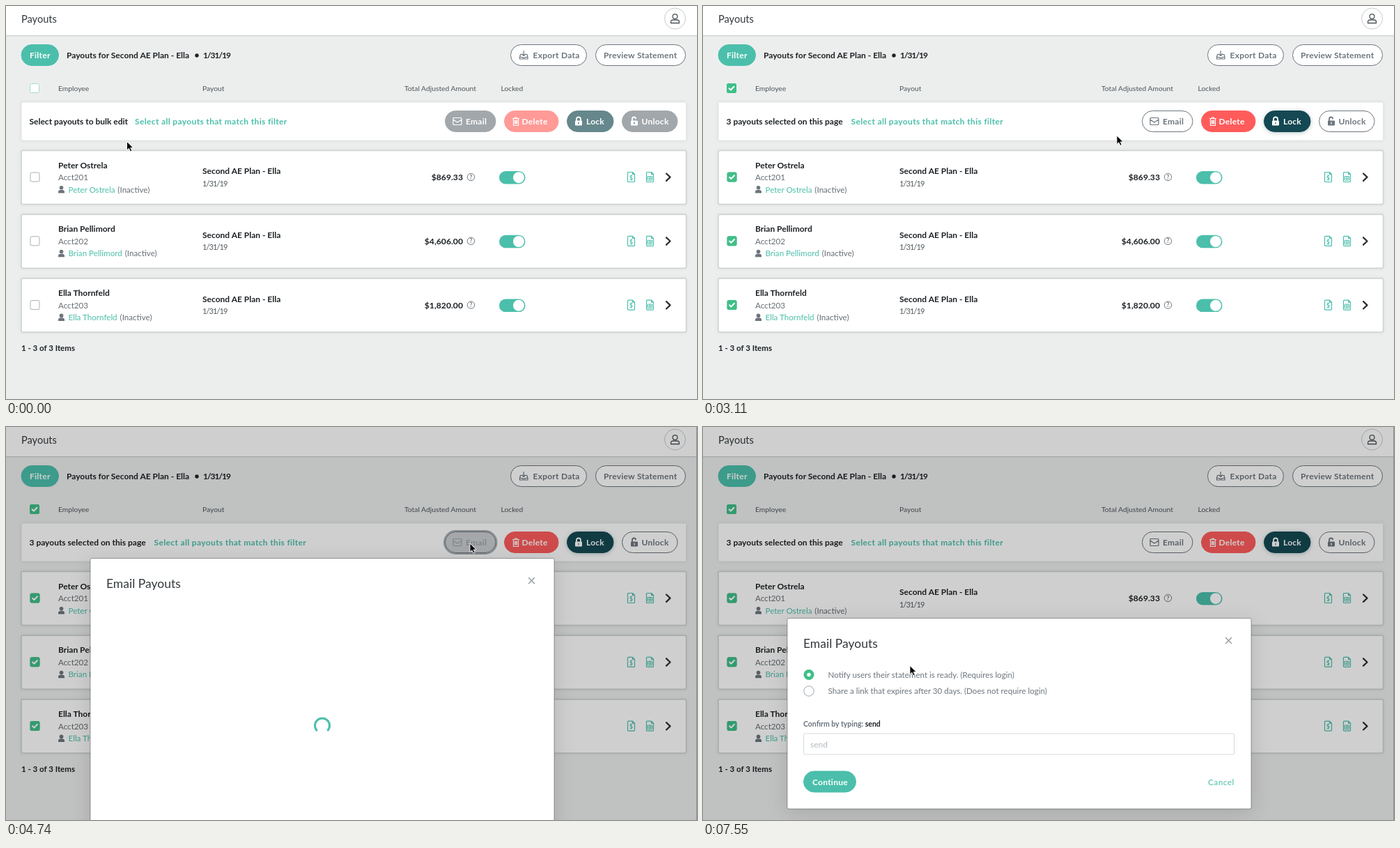
Animation of 992x564 px, one loop 8 s. Source, as an HTML page:

```html
<!DOCTYPE html>
<html lang="en">
<head>
<meta charset="utf-8">
<title>Email payouts</title>
<style>
  html, body { margin: 0; width: 100%; height: 100%; overflow: hidden; background: #eceeee; }
  svg { display: block; font: 12px Lato, "Open Sans", sans-serif; }
  text { white-space: pre; }
  .b { font-weight: 700; }
  .date { letter-spacing: -1px; }
  .wide { letter-spacing: .35px; }
  .btn { font-weight: 700; letter-spacing: .25px; }
  .card { filter: drop-shadow(0 0 2px rgba(0,0,0,.08)); }
  .glow { filter: drop-shadow(0 1px 3px rgba(20,72,82,.3)); }
  #modal { filter: drop-shadow(0 6px 14px rgba(0,0,0,.13)); }
</style>
</head>
<body>
<svg id="stage" width="992" height="564" viewBox="0 0 992 564"></svg>
<script>
const TEAL = '#4bbfab', GREEN = '#3fbf88', GRAY = '#6c757d', INK = '#1d2124', RED = '#ff5b5b', NAVY = '#144852';
const stage = document.getElementById('stage');

const text = (x, y, str, { size = 12, fill = INK, cls = '', anchor = 'start' } = {}) =>
  `<text x="${x}" y="${y}" font-size="${size}" fill="${fill}" class="${cls}" text-anchor="${anchor}">${str}</text>`;
const rect = (x, y, w, h, r, fill, stroke = 'none', more = '') =>
  `<rect x="${x}" y="${y}" width="${w}" height="${h}" rx="${r}" fill="${fill}" stroke="${stroke}" ${more}/>`;
const line = (x, y, d, color, width = 1.2, fill = 'none') =>
  `<path transform="translate(${x} ${y})" d="${d}" fill="${fill}" stroke="${color}" stroke-width="${width}" stroke-linejoin="round" stroke-linecap="round"/>`;

const ICON = {
  mail: 'M1 0H11Q12 0 12 1V9Q12 10 11 10H1Q0 10 0 9V1Q0 0 1 0M0 2.5L6 6.5 12 2.5',
  trash: 'M0 2H9M3 2V.5H6V2M1 2V12H8V2M3 4.5V9.5M4.5 4.5V9.5M6 4.5V9.5',
  tray: 'M3 5H1.5L.5 9V11.5H12V9L11 5H9.5M.5 9H4L5 10H7.5L8.5 9H12M6.2 0V6.5M3.8 4.5L6.2 7 8.6 4.5',
  doc: 'M1 0H7L10 3V13Q10 14 9 14H1Q0 14 0 13V1Q0 0 1 0M7 0V3H10',
  grid: 'M2 6H8V11.5H2ZM2 8.7H8M5 6V11.5',
  close: 'M0 0L8 8M8 0L0 8',
  check: 'M0 2.5L2.3 4.8 6.8 0'
};

// A pill button with an optional icon
function pill(x, y, w, label, tx, fill, color, { stroke = fill, icon = '', cls = '' } = {}) {
  return rect(x + .5, y + .5, w - 1, 30, 15, fill, stroke, `class="${cls}"`) + icon +
    text(tx, y + 20, label, { fill: color, cls: 'btn' });
}
const padlock = (x, y, color, open) =>
  rect(x, y + 5.5, 10, 7, 1, color) +
  line(x, y, open ? 'M2 5.5V3Q2 .5 4.5 .5T7 2.5' : 'M2 5.5V3.5Q2 .5 5 .5T8 3.5V5.5', color, 1.8) +
  rect(x + 4.3, y + 7.5, 1.4, 3, .5, color === 'white' ? '#5b7c82' : 'white');

const email = (fill, color, stroke) =>
  pill(630, 150, 73.5, 'Email', 660, fill, color, { stroke, icon: line(642, 160.5, ICON.mail, color) });
const remove = (fill) => pill(715, 150, 78.5, 'Delete', 740.5, fill, 'white', { icon: line(727.5, 159.5, ICON.trash, 'white') });
const lock = (fill, cls) => pill(805, 150, 67.5, 'Lock', 833, fill, 'white', { cls, icon: padlock(817, 159, 'white') });
const unlock = (fill, color, stroke) =>
  pill(884, 150, 80.5, 'Unlock', 912.5, fill, color, { stroke, icon: padlock(897, 159, color, true) });

const checkbox = (x, y, stroke) => rect(x + .5, y + .5, 13, 13, 2, 'white', stroke);
const checked = (x, y) => rect(x, y, 14, 14, 2.5, GREEN) + line(x + 3.6, y + 4.7, ICON.check, 'white', 2);
const person = (x, y, color) =>
  `<g transform="translate(${x} ${y})" fill="${color}"><circle cx="4.5" cy="2.8" r="2.8"/><path d="M0 10.5V9Q0 6 3 6H6Q9 6 9 9V10.5Z"/></g>`;

const rows = [
  ['Peter Ostrela', 'Acct201', '$869.33'],
  ['Brian Pellimord', 'Acct202', '$4,606.00'],
  ['Ella Thornfeld', 'Acct203', '$1,820.00']
];
const rowY = (i) => 207 + 91.8 * i;

function row([name, id, amount], i) {
  const small = { size: 11.6, fill: '#666d73' };
  return `<g transform="translate(0 ${rowY(i)})">` +
    rect(22, .5, 954.5, 77, 2, 'white', '#cdd1d3', 'stroke-width="1.5" class="card"') +
    checkbox(34.5, 31.5, '#a9afb4') +
    text(75, 25.5, name, { cls: 'b' }) + text(75, 43, id, small) + person(75, 51, GRAY) +
    text(89.5, 60.5, `<tspan fill="${TEAL}">${name}</tspan><tspan dx="1"> (Inactive)</tspan>`, small) +
    text(282, 34, 'Second AE Plan - Ella', { cls: 'b' }) +
    text(282, 51.5, '1/31/19', { size: 11.2, fill: '#555c61', cls: 'date' }) +
    text(656, 43, amount, { size: 12.2, cls: 'b', anchor: 'end' }) +
    `<circle cx="667.5" cy="38.5" r="5.2" fill="none" stroke="${GRAY}"/>` +
    text(667.5, 41.7, '?', { size: 8.5, fill: GRAY, cls: 'b', anchor: 'middle' }) +
    rect(708, 30, 37.5, 18.5, 9.2, TEAL) + '<circle cx="736" cy="39.2" r="8" fill="white"/>' +
    line(892.5, 31.5, ICON.doc, TEAL) + text(897.5, 42.8, '$', { size: 8.5, fill: TEAL, cls: 'b', anchor: 'middle' }) +
    line(919.5, 31.5, ICON.doc, TEAL) + line(919.5, 31.5, ICON.grid, TEAL, 1) +
    line(948, 33.5, 'M0 0L5.5 5.2 0 10.4', '#2b3236', 2.3) + '</g>';
}

const matchLink = (x) => text(x, 170, 'Select all payouts that match this filter', { fill: TEAL, cls: 'b wide' });
const heading = (x, str) => text(x, 121.5, str, { size: 10.3, fill: '#4d5458' });

const page =
  rect(0, 0, 992, 564, 0, '#eceeee') + rect(0, 0, 992, 42, 0, 'white') + rect(0, 42, 992, 1.3, 0, '#cbd0d2') +
  text(22, 23.5, 'Payouts', { size: 14.6, fill: '#33393d' }) +
  '<circle cx="960.5" cy="18" r="15" fill="white" stroke="#c6cacd"/>' +
  '<circle cx="960.5" cy="15" r="3.4" fill="none" stroke="#4d5458" stroke-width="1.3"/>' +
  line(954.5, 19.5, 'M0 5V3.5Q0 .5 3 .5H9Q12 .5 12 3.5V5Z', '#4d5458', 1.3) +
  pill(21.5, 55, 54.5, 'Filter', 34, TEAL, 'white') +
  text(87, 75, 'Payouts for Second AE Plan - Ella', { cls: 'b' }) +
  `<circle cx="274" cy="71" r="2.7" fill="${INK}"/>` +
  text(283, 75, '1/31/19', { cls: 'b date' }) +
  pill(724, 55, 110, 'Export Data', 756.5, 'white', GRAY, { stroke: GRAY, icon: line(737, 64.5, ICON.tray, GRAY) }) +
  pill(846, 55, 130, 'Preview Statement', 858, 'white', GRAY, { stroke: GRAY }) +
  checkbox(34, 111, '#9fdccf') +
  heading(75, 'Employee') + heading(282, 'Payout') + heading(572, 'Total Adjusted Amount') + heading(710.5, 'Locked') +
  rect(22, 138, 954.5, 55, 1, 'white', '#e2e5e6', 'class="card"') +
  rows.map(row).join('') +
  text(22, 495, '1 - 3 of 3 Items', { size: 11.5, cls: 'b' });

const bulk =
  '<g id="enabled">' + email('white', GRAY, GRAY) + remove(RED) + lock(NAVY, 'glow') + unlock('white', GRAY, GRAY) + '</g>' +
  '<g id="disabled">' + email('#a2a7ab', 'white') + remove('#ff9a97') + lock('#66878c') + unlock('#a2a7ab', 'white') + '</g>' +
  `<g id="hover">${email(GRAY, 'white')}</g>` +
  rect(629, 149, 75.5, 33, 16.5, 'none', GRAY, 'id="ring" stroke-width="2" stroke-opacity=".6"') +
  `<g id="none">${text(33.5, 170, 'Select payouts to bulk edit', { cls: 'b' }) + matchLink(185)}</g>` +
  `<g id="all">${text(33.5, 170, '3 payouts selected on this page', { cls: 'b' }) + matchLink(212.5)}` +
  checked(34, 111) + rows.map((r, i) => checked(34.5, rowY(i) + 31.5)).join('') + '</g>';

const body = { size: 11.6, fill: GRAY };
const modal =
  '<g id="modal"><rect id="sheet" x="121" width="666" rx="2" fill="white" stroke="#000" stroke-opacity=".35"/>' +
  text(144, 42.5, 'Email Payouts', { size: 17.5, fill: '#33393d' }) + line(750.5, 28, ICON.close, '#979da2', 1.5) +
  `<circle id="spinner" cx="454" cy="240" r="10.5" fill="none" stroke="${TEAL}" stroke-width="3" stroke-dasharray="49.5 16.5"/>` +
  '<g id="form">' +
  `<circle cx="152" cy="81" r="7.5" fill="${GREEN}"/><circle cx="152" cy="81" r="2.7" fill="white"/>` +
  '<circle cx="152" cy="104.5" r="7.2" fill="white" stroke="#a0a8b2"/>' +
  text(179.5, 85, 'Notify users their statement is ready. (Requires login)', body) +
  text(179.5, 108.5, 'Share a link that expires after 30 days. (Does not require login)', body) +
  text(144, 155.5, `Confirm by typing: <tspan fill="${INK}">send</tspan>`, { size: 10.5, fill: GRAY, cls: 'b' }) +
  rect(144.5, 165.5, 618, 30, 2, 'white', '#d5d9dc') + text(154, 185, 'send', { fill: '#b3b9be' }) +
  pill(144, 219, 76, 'Continue', 157, TEAL, 'white') +
  text(725, 239, 'Cancel', { fill: TEAL, cls: 'wide' }) + '</g></g>';

const pointer =
  '<g id="cursor" stroke-linejoin="round"><path id="arrow" d="M0 0V12.5L2.9 9.8 5 14.3 7.2 13.3 5.2 9H9.2Z" fill="black" stroke="white" stroke-width=".9"/>' +
  '<path id="hand" d="M-1.5 8V1Q-1.5-.5-.2-.5T1.2 1V5Q3 4 3.8 5.5 5.5 4.8 6.2 6.2 8 5.8 8 7.8V10.5L6.8 14.5H.3L-3.5 9.5Q-4 7.3-1.5 8ZM1.2 5V7.5M3.8 5.5V7.5M6.2 6.2V8" fill="white" stroke="black"/></g>';

stage.innerHTML = page + bulk +
  rect(0, 0, 992, 564, 0, 'black', 'none', 'id="shade"') + rect(991, 0, 1, 564, 0, '#8b8f90', 'none', 'id="edge"') +
  modal + pointer;

const el = {};
stage.querySelectorAll('[id]').forEach((e) => el[e.id] = e);
const fade = (name, o) => el[name].setAttribute('opacity', o);
const show = (name, on) => fade(name, on ? 1 : 0);

// The screen refreshes in discrete ticks while something is moving
const TICK = 146;
const steps = (t, start, n) => Math.max(0, Math.min(n, Math.floor((t - start) / TICK) + 1)) / n;
const ease = (p) => p < .5 ? 4 * p ** 3 : 1 - (2 - 2 * p) ** 3 / 2;

// start time, ticks, destination
const moves = [
  [140, 8, 38, 122], [1930, 4, 441, 212], [2810, 3, 594, 186],
  [3400, 4, 666, 167], [6230, 6, 519.5, 327], [7400, 2, 297, 342.5]
];

function draw(t) {
  let x = 173.5, y = 194.5;
  for (const [start, n, tx, ty] of moves) {
    const p = ease(steps(t, start, n));
    x += (tx - x) * p;
    y += (ty - y) * p;
  }
  const opened = t >= 4590;
  const overEmail = t >= 3400 + 2 * TICK && !opened;
  const hand = t >= 140 + 7 * TICK && t < 1930 || overEmail;
  el.cursor.setAttribute('transform', `translate(${x} ${y})`);
  show('hand', hand);
  show('arrow', !hand);

  const picked = t >= 1330, active = ease(steps(t, 1330, 3));
  show('all', picked);
  show('none', !picked);
  fade('enabled', active);
  fade('disabled', 1 - active);

  const k = Math.round(steps(t, 4590, 4) * 4);
  fade('hover', opened ? [1, .9, .35, .1, 0][k] : steps(t, 3400 + 2 * TICK, 2));
  show('ring', k > 0 && k < 4);

  fade('shade', [0, .075, .19, .19, .19][k]);
  show('edge', opened);
  fade('modal', [0, .35, 1, 1, 1][k]);
  const ready = k > 2, top = [166, 166, 188.5, 274.5, 274.5][k];
  el.modal.setAttribute('transform', `translate(0 ${top})`);
  el.sheet.setAttribute('height', ready ? 273.5 : 420);
  show('form', ready);
  show('spinner', !ready);
  el.spinner.setAttribute('transform', `rotate(${67 * k} 454 240)`);
}

const begin = performance.now();
function loop(now) {
  draw(Math.max(0, now - begin) % 8000);
  requestAnimationFrame(loop);
}
loop(begin);
</script>
</body>
</html>
```
